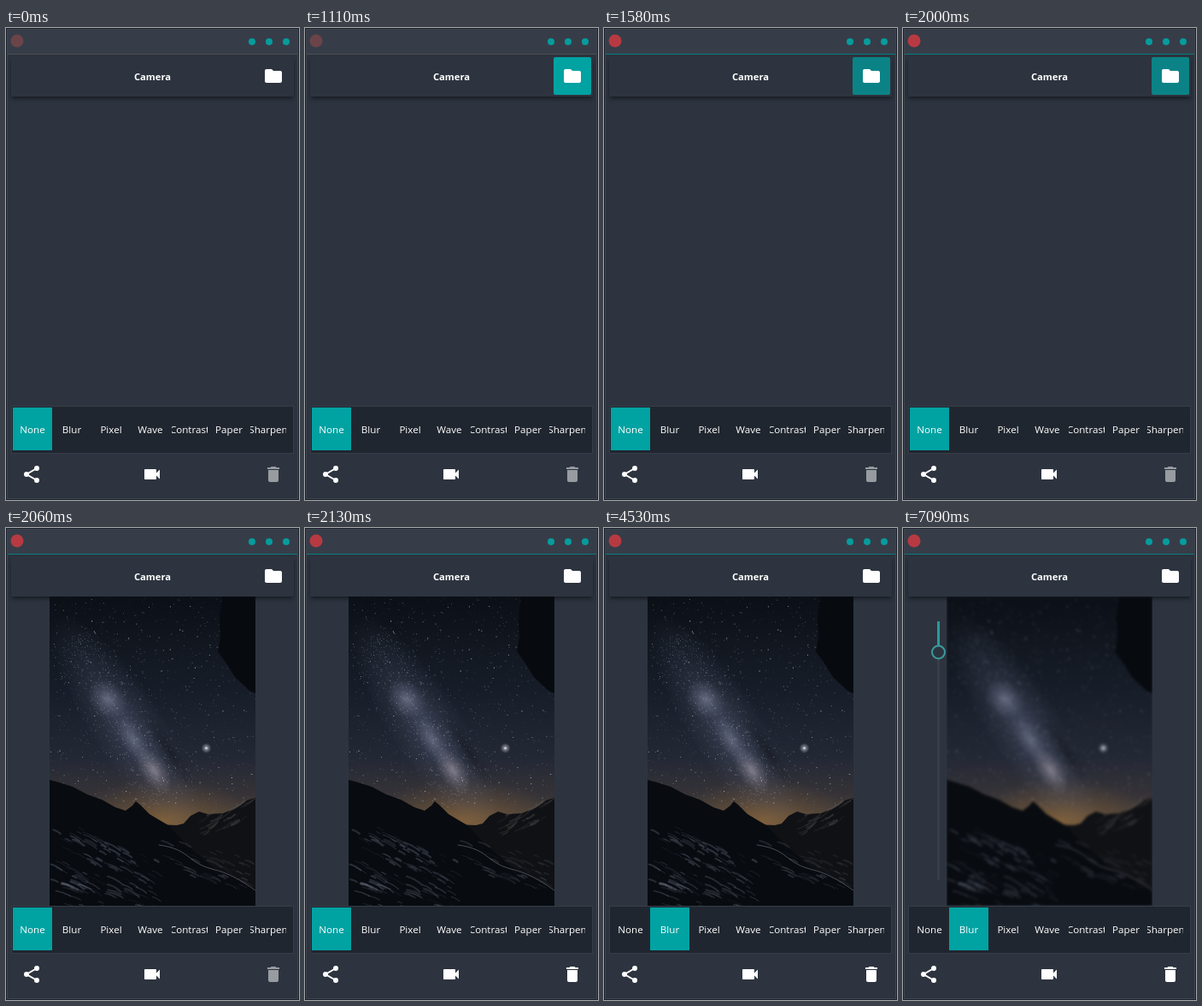
These frames come from a looping animation (343x551 px, 8000 ms). An HTML page with a canvas:

```html
<!DOCTYPE html>
<html lang="en">
<head>
<meta charset="utf-8">
<title>Camera</title>
<style>
  :root { --teal: #00a2a2; --bg: #2d343f; }
  html, body { margin: 0; width: 100%; height: 100%; overflow: hidden; background: var(--bg); }
  #stage { position: relative; width: 343px; height: 551px; overflow: hidden; background: var(--bg); }
  #stage > * { position: absolute; }
  svg { left: 0; top: 0; }
  .header { left: 6px; top: 34px; width: 331px; height: 46px; background: var(--bg); box-shadow: 0 3px 5px -1px #14181f; }
  .photo { left: 51px; top: 80px; width: 241px; height: 361px; overflow: hidden; }
  canvas { display: block; }
  .strip { left: 6px; top: 441px; width: 329px; height: 54px; background: #20262f; border: 1px solid #363d48; }
  .pick { left: 8px; top: 443px; width: 46px; height: 50px; background: var(--teal); }
  text { font-family: "Open Sans", "Noto Sans", sans-serif; font-size: 11.6px; fill: #fff; text-anchor: middle; }
  .title { font-size: 11.2px; font-weight: 700; }

  .anim { animation: 8s step-end infinite; }
  .photo.anim { animation-name: load; }
  canvas.anim { animation-name: blur; }
  .pick.anim { animation-name: pick; }
  .slider.anim { animation-name: slider; }
  .button.anim { animation-name: button; }
  .logo.anim { animation-name: logo; }
  .rule.anim { animation-name: rule; }
  .trash.anim { animation-name: trash; }

  @keyframes load { 0% { visibility: hidden } 25.75%, 100% { visibility: visible } }
  @keyframes blur { 0% { filter: none } 88.625%, 100% { filter: blur(1.8px) } }
  @keyframes pick { 0% { transform: none } 56.625%, 100% { transform: translateX(46px) } }
  @keyframes slider { 0% { visibility: hidden } 88.625%, 100% { visibility: visible } }
  @keyframes button {
    0% { fill: transparent } 13.875% { fill: #00a2a2 } 19.75% { fill: #0b8386 }
    22% { fill: #00a2a2 } 25% { fill: #0b8386 } 25.75%, 100% { fill: transparent }
  }
  @keyframes logo { 0% { fill: #6b4449 } 19.75% { fill: #b73a42 } 22% { fill: #6b4449 } 25%, 100% { fill: #b73a42 } }
  @keyframes rule { 0% { fill: #504d51 } 19.75% { fill: #087d7e } 22% { fill: #504d51 } 25%, 100% { fill: #087d7e } }
  @keyframes trash { 0% { fill: #989ca1 } 26.625%, 100% { fill: #fff } }
</style>
</head>
<body>
<div id="stage">
  <div class="header"></div>
  <div class="photo anim"><canvas class="anim" width="241" height="361"></canvas></div>
  <div class="strip"></div>
  <div class="pick anim"></div>
  <svg width="343" height="551" viewBox="0 0 343 551">
    <rect x="1" y="1" width="341" height="29" fill="#363d48"/>
    <rect class="rule anim" x="1" y="30" width="341" height="1"/>
    <rect x="1.5" y="1.5" width="340" height="548" fill="none" stroke="#3d4550"/>
    <rect x=".5" y=".5" width="342" height="550" fill="none" stroke="#1c222b"/>
    <circle class="logo anim" cx="13" cy="15" r="7.5"/>
    <g fill="#079b9d">
      <circle cx="288" cy="16" r="4"/><circle cx="308" cy="16" r="4"/><circle cx="328" cy="16" r="4"/>
    </g>
    <text class="title" x="171.5" y="61">Camera</text>
    <rect class="button anim" x="291" y="34" width="44" height="44" rx="2"/>
    <g fill="#fff">
      <path transform="translate(301 44)" d="M10 4H4c-1.1 0-2 .9-2 2v12c0 1.1.9 2 2 2h16c1.1 0 2-.9 2-2V8c0-1.1-.9-2-2-2h-8z"/>
      <g transform="translate(18 509)">
        <path d="M18 5L6 12l12 7" fill="none" stroke="#fff" stroke-width="2"/>
        <circle cx="18" cy="5" r="3"/><circle cx="6" cy="12" r="3"/><circle cx="18" cy="19" r="3"/>
      </g>
      <path transform="translate(159 509)" d="M17 10.5V7c0-.55-.45-1-1-1H4c-.55 0-1 .45-1 1v10c0 .55.45 1 1 1h12c.55 0 1-.45 1-1v-3.5l4 4v-11z"/>
      <path class="trash anim" transform="translate(301 509)" d="M6 19c0 1.1.9 2 2 2h8c1.1 0 2-.9 2-2V7H6zM19 4h-3.5l-1-1h-5l-1 1H5v2h14z"/>
    </g>
    <g id="labels"></g>
    <g class="slider anim">
      <rect x="40" y="109" width="3" height="302" fill="#383f49"/>
      <rect x="40" y="109" width="3" height="30" fill="#2b9a9c"/>
      <circle cx="41.5" cy="145" r="7.5" fill="#2d343f" stroke="#3a9a9d" stroke-width="2"/>
    </g>
  </svg>
</div>
<script>
  const CELL = 46;
  document.getElementById('labels').innerHTML =
    ['None', 'Blur', 'Pixel', 'Wave', 'Contrast', 'Paper', 'Sharpen'].map((name, i) => {
      const x = 8 + i * CELL;
      return `<clipPath id="c${i}"><rect x="${x + 2}" y="443" width="42" height="50"/></clipPath>
        <text x="${x + CELL / 2}" y="473" clip-path="url(#c${i})">${name}</text>`;
    }).join('');

  const W = 241, H = 361;
  const g = document.querySelector('canvas').getContext('2d');
  let seed = 7;
  const rnd = () => (seed = seed * 16807 % 2147483647) / 2147483647;
  const bell = () => rnd() + rnd() + rnd() - 1.5;

  function glow(x, y, rx, ry, angle, rgb, alpha) {
    g.save();
    g.translate(x, y);
    g.rotate(angle);
    g.scale(rx, ry);
    const grad = g.createRadialGradient(0, 0, 0, 0, 0, 1);
    grad.addColorStop(0, `rgba(${rgb},${alpha})`);
    grad.addColorStop(.5, `rgba(${rgb},${alpha * .4})`);
    grad.addColorStop(1, `rgba(${rgb},0)`);
    g.fillStyle = grad;
    g.fillRect(-1, -1, 2, 2);
    g.restore();
  }

  function shape(points, fill) {
    g.beginPath();
    points.forEach(([x, y]) => g.lineTo(x, y));
    g.fillStyle = fill;
    g.fill();
  }

  function star(x, y, size, alpha) {
    g.fillStyle = `rgba(205,212,228,${alpha})`;
    g.fillRect(x, y, size, size);
  }

  // Sky
  const sky = g.createLinearGradient(0, 0, 0, 270);
  [[0, '#0b0f16'], [.4, '#171d28'], [.7, '#232835'], [.86, '#363337'], [1, '#544637']]
    .forEach(([at, color]) => sky.addColorStop(at, color));
  g.fillStyle = sky;
  g.fillRect(0, 0, W, H);
  glow(135, 262, 105, 50, 0, '165,118,62', .55);

  // Milky Way
  glow(90, 150, 150, 42, 1, '105,115,145', .4);
  glow(68, 120, 26, 20, .8, '150,155,180', .5);
  glow(98, 168, 32, 14, 1, '150,155,180', .4);
  glow(122, 203, 30, 16, 1, '175,165,180', .6);
  glow(140, 180, 55, 12, 1, '12,14,20', .5);

  for (let i = 0; i < 1100; i++) star(rnd() * W, rnd() * 245, .5 + rnd() * .6, .1 + rnd() ** 3 * .75);
  for (let i = 0; i < 900; i++) {
    const t = rnd(), d = bell() * 36;
    star(28 + t * 110 + d, 45 + t * 190 - d * .6, .8, .1 + rnd() * .4);
  }
  glow(183.5, 177, 6, 6, 0, '225,225,235', .8);
  star(182.5, 176, 2, 1);

  // Overhanging rock
  shape([[202, 0], [199, 25], [200, 48], [197, 64], [207, 78], [217, 94], [234, 110], [W, 113], [W, 0]], '#070a0f');

  // Ridges
  shape([[125, 266], [149, 267], [157, 265], [165, 256], [175, 251], [185, 254], [203, 253],
    [213, 249], [223, 244], [231, 238], [W, 235], [W, H], [125, H]], '#0f1115');
  shape([[0, 214], [11, 217], [27, 222], [44, 231], [61, 237], [77, 246], [89, 250], [97, 244], [101, 239],
    [107, 244], [117, 254], [127, 260], [139, 267], [160, 289], [190, 315], [W, 341], [W, H], [0, H]], '#080b10');

  // Snow on the slopes
  g.lineCap = 'round';
  function streaks(n, x0, y0, w, h, slope, color) {
    for (let i = 0; i < n; i++) {
      const x = x0 + rnd() * w, y = y0 + (x - x0) * slope * .6 + rnd() * h, len = 4 + rnd() * 15;
      g.strokeStyle = `rgba(${color},${.12 + rnd() * .32})`;
      g.lineWidth = .5 + rnd() * 2;
      g.beginPath();
      g.moveTo(x, y);
      g.quadraticCurveTo(x + len * .5, y + len * slope * .2, x + len, y + len * slope);
      g.stroke();
    }
  }
  streaks(95, 0, 258, 125, 68, .55, '92,101,117');
  streaks(35, 0, 325, 110, 34, .35, '110,118,132');
  streaks(45, 130, 278, 100, 38, .45, '75,80,90');
  streaks(26, 175, 258, 55, 24, -.6, '90,84,80');
  g.strokeStyle = 'rgba(125,130,140,.55)';
  g.lineWidth = 1;
  g.beginPath();
  g.moveTo(128, 290);
  g.bezierCurveTo(165, 295, 160, 310, 190, 318);
  g.bezierCurveTo(210, 323, 222, 330, W, 343);
  g.stroke();
</script>
</body>
</html>
```
